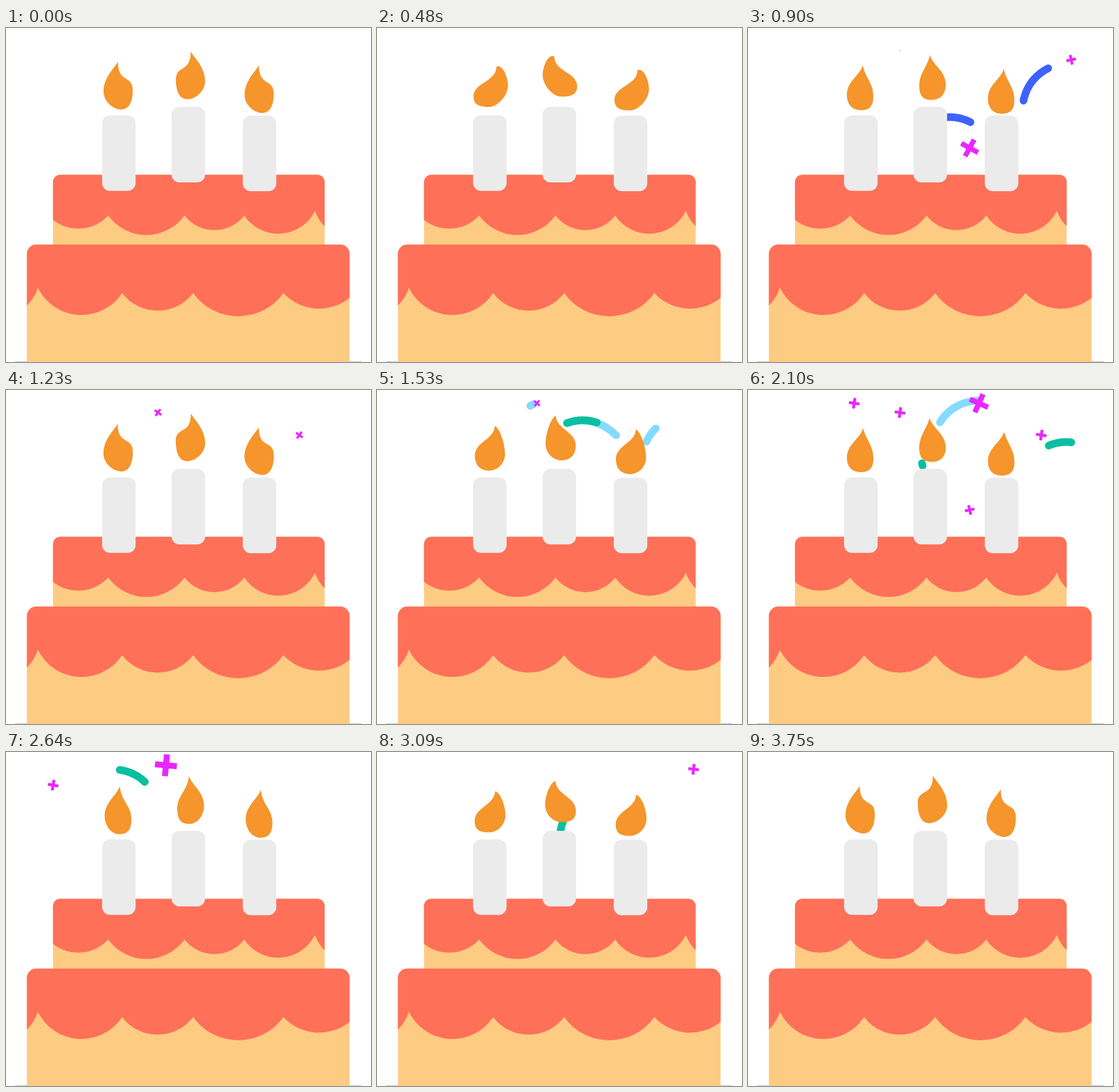
An HTML page with a canvas for the animation above (3.78 s loop, 550 px wide and 504 px high).

```html
<!DOCTYPE html>
<html lang="en">
<head>
<meta charset="utf-8">
<title>Birthday cake</title>
<style>
  html, body { margin: 0; overflow: hidden; background: #fff; }
  canvas { display: block; }
</style>
</head>
<body>
<canvas id="stage" width="550" height="504"></canvas>
<script>
const ctx = document.getElementById('stage').getContext('2d');
const { sin, cos, abs, min, max, hypot, PI } = Math;
const LOOP = 3780, FLICKER = 1260, LIFE = 480;
const CORAL = '#ff7059', CREAM = '#fdcb82', WAX = '#ebebeb', FIRE = '#f5952c';
const BLUE = '#3d62ff', SKY = '#85daff', TEAL = '#08bfa1', PINK = '#e926ff';

const topIcing = new Path2D('M70 289A61.7 61.7 0 0 0 154 283A71 71 0 0 0 269 283' +
  'A57 57 0 0 0 359 283A61.5 61.5 0 0 0 465.5 276A60 60 0 0 0 481 300V221H70Z');
const baseIcing = new Path2D('M31 419.5A70 70 0 0 0 48 392A73.2 73.2 0 0 0 175 400' +
  'A67.2 67.2 0 0 0 282 400A83.6 83.6 0 0 0 418 400A73 73 0 0 0 518 407V326H31Z');

function roundRect(x, y, w, h, radii) {
  ctx.beginPath();
  ctx.roundRect(x, y, w, h, radii);
}

function tier(x, y, w, h, r, icing) {
  ctx.save();
  roundRect(x, y, w, h, [r, r, 0, 0]);
  ctx.fillStyle = CREAM;
  ctx.fill();
  ctx.clip();
  ctx.fillStyle = CORAL;
  ctx.fill(icing);
  ctx.restore();
}

function candle(x, y) {
  ctx.fillStyle = WAX;
  roundRect(x, y, 50.5, 114, 12);
  ctx.fill();
}

// The tip rises and falls once per flicker while the flame leans left (-1) to right (1).
function flamePath(t) {
  const a = 2 * PI * t / FLICKER;
  const lean = 0.15 - 0.82 * cos(a) + 0.68 * sin(a) - 0.33 * cos(2 * a) - 0.16 * sin(2 * a);
  const bulge = lean * lean;
  const tipX = 173.4 + 4.8 * lean, tipY = 55.2 - 4.2 * cos(a);
  const right = 189 + 1.5 * lean + 3.5 * bulge, rightY = 103 - 9 * bulge;
  const left = 149 - 2 * bulge, leftY = tipY + 45;
  const foot = 169.7 - 2.5 * lean + 1.5 * bulge, footY = 124 - lean - 2 * bulge;
  const path = new Path2D();
  path.moveTo(tipX, tipY);
  path.bezierCurveTo(tipX + 4 + 4 * lean, tipY + 17 - 16 * lean,
    right, rightY - 19 + 5 * lean, right, rightY);
  path.bezierCurveTo(right, rightY + 15, foot + 13, footY, foot, footY);
  path.bezierCurveTo(foot - 13, footY, left, leftY + 14, left, leftY);
  path.bezierCurveTo(left, leftY - 21, tipX - 3.5 + 3 * lean, tipY + 16 + 5 * lean, tipX, tipY);
  return path;
}

function flame(path, dx, dy, flip) {
  ctx.save();
  ctx.translate(dx, dy);
  ctx.scale(flip, 1);
  ctx.fillStyle = FIRE;
  ctx.fill(path);
  ctx.restore();
}

// A ribbon runs along a clockwise arc; at its peak it spans the two given points.
function ribbon(t, color, peak, x0, y0, x1, y1) {
  const age = (t - peak) / LIFE;
  if (abs(age) >= 0.5) return;
  const head = min(1.4, 1 + 2.8 * age), tail = max(-0.4, 2.8 * age);
  const dx = x1 - x0, dy = y1 - y0, bend = hypot(dx, dy) / 260;
  ctx.beginPath();
  for (let i = 0; i <= 20; i++) {
    const s = tail + (head - tail) * i / 20, lift = 2 * s * (1 - s) * bend;
    ctx.lineTo(x0 + dx * s + dy * lift, y0 + dy * s - dx * lift);
  }
  ctx.strokeStyle = color;
  ctx.lineWidth = 11.5;
  ctx.lineCap = ctx.lineJoin = 'round';
  ctx.stroke();
}

// A cross grows, spins and shrinks again around its peak.
function cross(t, size, peak, x, y) {
  const age = (t - peak) / LIFE;
  if (abs(age) >= 0.5) return;
  const d = size * cos(PI * age), w = d * 0.27;
  ctx.save();
  ctx.translate(x, y);
  ctx.rotate((5 + 140 * age) * PI / 180);
  ctx.fillStyle = PINK;
  ctx.fillRect(-d / 2, -w / 2, d, w);
  ctx.fillRect(-w / 2, -d / 2, w, d);
  ctx.restore();
}

function confetti(t) {
  ribbon(t, BLUE, 900, 415, 110, 452, 61);
  ribbon(t, BLUE, 900, 290, 136, 335, 142);
  ribbon(t, SKY, 1530, 286, 50, 360, 68);
  ribbon(t, TEAL, 1530, 286, 50, 331, 49);
  ribbon(t, SKY, 1530, 406, 78, 420, 58);
  ribbon(t, SKY, 1750, 247, 17, 287, 17);
  ribbon(t, SKY, 2100, 289, 49, 345, 16);
  ribbon(t, TEAL, 2100, 453, 84, 487, 79);
  ribbon(t, TEAL, 2325, 260, 98, 268, 60);
  ribbon(t, TEAL, 2640, 171, 27, 209, 45);
  ribbon(t, TEAL, 3090, 276, 130, 285, 95);

  const big = 33, small = 16;
  cross(t, big, 820, 334, 181);
  cross(t, small, 960, 487, 48);
  for (const peak of [1125, 2090]) {
    cross(t, small, peak, 229, 34);
    cross(t, small, peak, 442, 68);
  }
  for (const peak of [1717, 2640]) cross(t, big, peak, 241, 20);
  cross(t, big, 2035, 348, 20);
  cross(t, small, 2090, 160, 20);
  cross(t, small, 2160, 334, 181);
  cross(t, small, 2625, 71, 50);
  cross(t, small, 3085, 477, 26);
}

function draw(t) {
  ctx.fillStyle = '#fff';
  ctx.fillRect(0, 0, 550, 504);
  ctx.fillStyle = '#c4c4c4';
  ctx.fillRect(14, 503, 522, 1);
  confetti(t);
  tier(70.8, 221.5, 409.4, 105.5, 11, topIcing);
  tier(31.5, 326.8, 486.2, 177.2, 14, baseIcing);
  candle(144.8, 131.8);
  candle(249.5, 119);
  candle(356.8, 132.3);
  const path = flamePath(t);
  flame(path, 0, 0, 1);
  flame(path, 447, -15.5, -1);
  flame(path, 212.5, 5.3, 1);
}

function tick() {
  draw(performance.now() % LOOP);
  requestAnimationFrame(tick);
}
tick();
</script>
</body>
</html>
```
